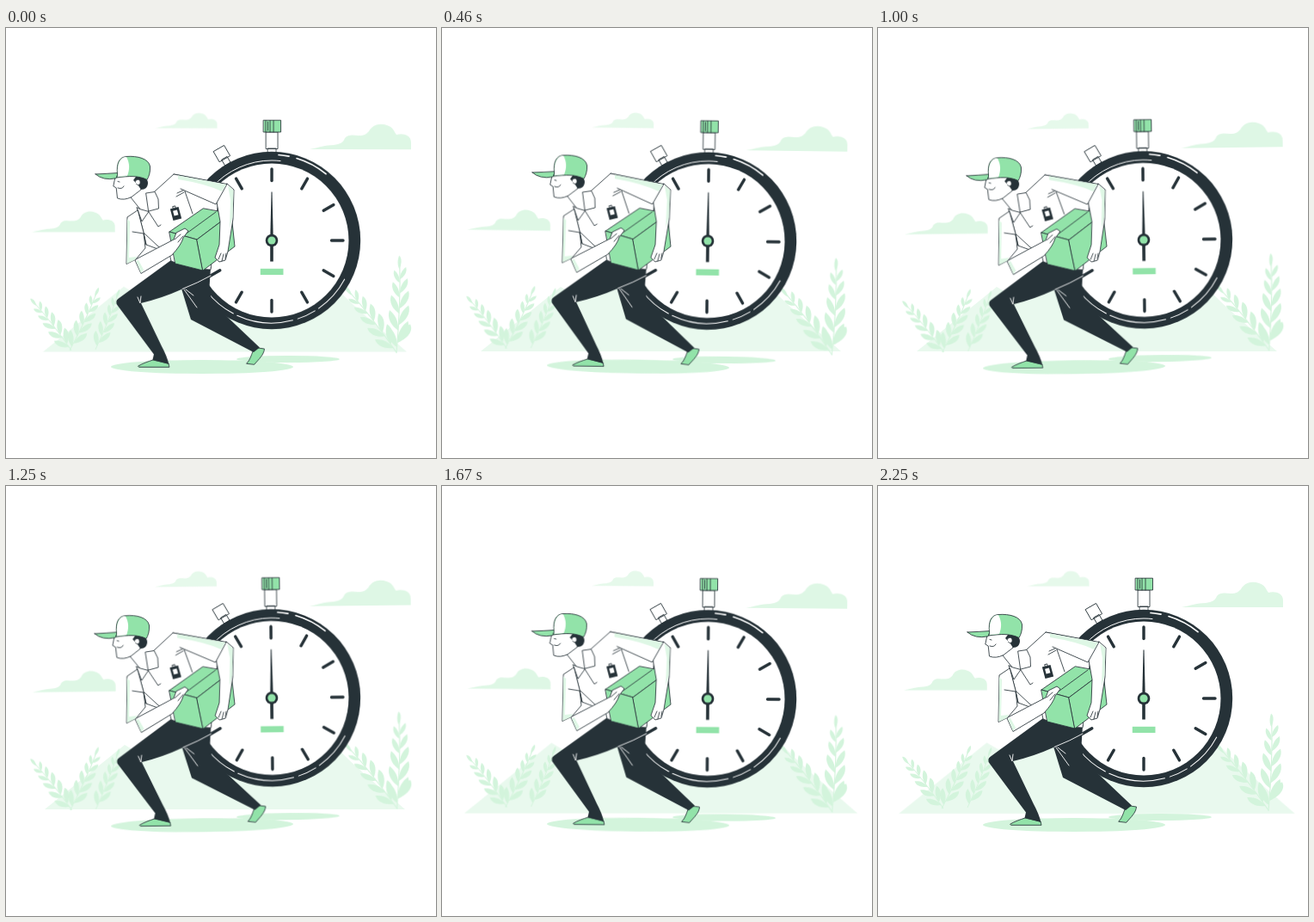
Write an HTML page without scripts that moves like this. It is 500 px wide and 500 px high and loops after 2290 ms.

```html
<!DOCTYPE html>
<html lang="en">
<head>
<meta charset="utf-8">
<title>Delivery against the clock</title>
<style>
html, body { margin: 0; width: 100%; height: 100%; overflow: hidden; background: #fff; }
svg { display: block; width: 100%; height: 100%; }

.sway { animation: sway 2.29s linear infinite; }
.hill { animation: pulse 2.29s linear infinite; transform-origin: 254.5px 326px; fill: #e9f9ee; }
.clouds { transform-origin: 250.5px 168px; fill: #def7e5; }
.shadows { transform-origin: 255px 391px; fill: #d3f4dc; }
.plants { transform-origin: 250px 324px; fill: #d3f4dc; }
.race { transform-origin: 258px 250px; }

.ink { stroke: #263238; stroke-width: .85; stroke-linejoin: round; stroke-linecap: round; }
.line { fill: none; }
.white { fill: #fff; }
.green { fill: #92e3a9; }
.dark { fill: #263238; }
.pale { fill: #def7e5; }
.glint { fill: none; stroke: #fff; stroke-linecap: round; }

/* a 1.5s swing cut off by the shorter loop */
@keyframes sway {
  0% { transform: rotate(.037deg); }
  15.9% { transform: rotate(1deg); }
  48.8% { transform: rotate(-1deg); }
  81.8% { transform: rotate(1deg); }
  100% { transform: rotate(-.1deg); }
}
/* a 1.5s double heartbeat cut off by the shorter loop */
@keyframes pulse {
  0% { transform: scale(1.009); }
  6% { transform: scale(1.1); }
  19.2%, 25.7% { transform: scale(1); }
  32.3% { transform: scale(1.1); }
  38.9%, 65.3% { transform: scale(1); }
  71.9% { transform: scale(1.1); }
  85.1%, 91.7% { transform: scale(1); }
  98.25% { transform: scale(1.1); }
  100% { transform: scale(1.073); }
}
</style>
</head>
<body>
<svg viewBox="0 0 500 500">
  <defs>
    <path id="cloud" d="M0 0C10-2 19-5 28-5 36-6 39-8 41-13 45-18 52-16 57-16 64-16 66-18 69-21 73-29 82-31 90-28 97-26 98-21 101-17 108-19 118-17 118-8V0Z"/>
    <path id="leaf" d="M0 0C0-7 4-12 10-15 13-9 7-3 0 0Z"/>
    <g id="pair"><use href="#leaf"/><use href="#leaf" transform="translate(0 4) scale(-1 1)"/></g>
    <g id="frond">
      <path d="M0 0Q3-40 0-72" fill="none" stroke="#d3f4dc" stroke-width="1.1"/>
      <use href="#pair" transform="translate(.6 -9) scale(1.1)"/>
      <use href="#pair" transform="translate(1.2 -22) scale(1.05)"/>
      <use href="#pair" transform="translate(1.5 -35) scale(.95)"/>
      <use href="#pair" transform="translate(1.3 -47) scale(.8)"/>
      <use href="#pair" transform="translate(.8 -58) scale(.65)"/>
      <use href="#leaf" transform="translate(0 -66) rotate(-38) scale(.6)"/>
    </g>
    <path id="tick" d="M0-83V-69.500" stroke="#263238" stroke-width="3.4" stroke-linecap="round"/>
    <g id="ticks">
      <use href="#tick"/><use href="#tick" transform="rotate(30)"/><use href="#tick" transform="rotate(60)"/>
    </g>
  </defs>

  <path class="hill" d="M45 376L138 301 150 308 185 298 250 300 386 306Q402 322 418 336L464 376Z"/>

  <g class="clouds sway">
    <use href="#cloud" x="353" y="141"/>
    <use href="#cloud" transform="translate(30 237.500) scale(.82)"/>
    <use href="#cloud" transform="translate(173.500 116.700) scale(.61)" opacity=".75"/>
  </g>

  <g class="shadows sway">
    <ellipse cx="228" cy="394" rx="106" ry="8"/>
    <ellipse cx="328" cy="385" rx="60" ry="4"/>
  </g>

  <g class="plants sway">
    <use href="#frond" transform="translate(76 375) rotate(-38) scale(.85 1)"/>
    <use href="#frond" transform="translate(74 375) rotate(25) scale(.85 1.05)"/>
    <use href="#frond" transform="translate(104 374) rotate(22) scale(.75 .98)"/>
    <use href="#frond" transform="translate(454 378) rotate(2) scale(1.05 1.48)"/>
    <use href="#frond" transform="translate(454 377) rotate(-38) scale(1 1.28)"/>
    <use href="#leaf" transform="translate(455 366) scale(1.5 1.45)"/>
  </g>

  <g class="race sway">
    <!-- stopwatch -->
    <g class="ink">
      <path class="white" d="M304.500 140H314V146H304.500ZM302.500 121H316V140.500H302.500Z"/>
      <path class="green" d="M299.500 107.200H319.500V121H299.500Z"/>
      <path class="line" d="M302 107.500V121M304.500 109V119M307 107.500V121M311 107.500V121"/>
      <g class="white" transform="translate(251 146) rotate(-30)">
        <path d="M-3.500 6H3.500V14H-3.500ZM-7-7H7V7H-7Z"/>
      </g>
    </g>
    <g transform="translate(309 247)">
      <circle class="dark" r="103.2"/>
      <circle class="white" r="89.5"/>
      <g class="glint" stroke-width="1">
        <circle r="93" stroke-dasharray="62 6 88 400" transform="rotate(180)"/>
        <circle r="96" stroke-dasharray="46 5 22 6 66 5 40 500" transform="rotate(28)"/>
        <path d="M8-99.500A99.800 99.800 0 0 1 20-97.800M29-95.500A99.800 99.800 0 0 1 63-77.400" stroke-width="1.700"/>
      </g>
      <use href="#ticks"/>
      <use href="#ticks" transform="rotate(90)"/>
      <use href="#ticks" transform="rotate(180)"/>
      <use href="#ticks" transform="rotate(270)"/>
      <path class="dark" d="M-.5-56.500H.5L1.800 0V24.500H-1.800V0Z"/>
      <circle class="dark" r="7.3"/>
      <circle class="green" r="4.6"/>
      <path class="green" d="M-13.200 32.800H13.500V40H-13.200Z"/>
    </g>

    <!-- shoes and trousers -->
    <g class="ink green">
      <path d="M154 393C159 390 165 388 171 386L189 390 190 394.300H155Z"/>
      <path d="M280 390C284 386 285 381 287 376L293 372 300.500 373C300 380 294 385 289 391Z"/>
    </g>
    <path class="dark" d="M238 279L236.500 302 239.500 319 295 371.500 288 377 215 339 204 303Z"/>
    <path class="dark" d="M192 270L131 314.500Q126 318 130 323L172 379.500 170.500 386 189.500 391Q187 381 181 370L157 320Q182 314 204 304 234 292 239 278Z"/>
    <path class="glint" stroke-width=".9" d="M205 303.500Q224 296 238 288M153 313L156 320 157 312M207 304L222 325M209 304L218 311"/>

    <!-- neck and torso -->
    <path class="ink white" d="M153 212L160 238 163 252 190 262 192 271Q214 281 238 281L247 200 257 182 195 170 173 190 164 198Z"/>
    <path class="white" d="M146 196L157 214 166 213 175 195 164 182 150 186Z"/>
    <path class="ink line" d="M145 197L157 212"/>

    <!-- head and cap -->
    <path class="ink white" d="M127 173L124.800 184 128.200 186 129.500 198Q137 201 146 196.500L157 188 158 172Z"/>
    <path class="dark" d="M151 173C158 171 165 174 165 180 165 185 162 188 157 188L153 182 148 177Z"/>
    <path class="ink white" d="M150.500 178C152 175 157 176 156 180.500 155 183 153 183 151.500 181.500"/>
    <path class="ink line" d="M130 186Q135 188 137 184M130 178.500L132 179"/>
    <path class="ink green" d="M104 170Q117 169.500 131 168.500L128 174.800Q113 178 104 170Z"/>
    <path class="ink green" d="M129.500 170C128 157 132 150 140 149.500 153 148.500 166 152 167.500 161 168 168 166 173 164 176.500 154 171.500 143 172 129 174Z"/>
    <path class="white" d="M130 170C129 157 133 150 140 150 144 157 144 165 141 172L130 173Z"/>

    <!-- collar, seam and badge -->
    <path class="ink white" d="M163 192L173 190.500 177 199 177.500 210 166 213ZM152 209L158 225 166 213.500 157 211Z"/>
    <path class="ink line" d="M166 214L177 231 180 229M199 192L210 187M198 196L207 191M161 239L177 254 190 262"/>
    <g transform="translate(197.500 216) rotate(-15)">
      <path class="ink line" d="M-1.500-6V-9H1.500V-6"/>
      <path class="dark" d="M-5-7H5V7H-5Z"/>
      <path class="white" d="M-2.500-4H2.500V2H-2.500Z"/>
    </g>

    <!-- parcel -->
    <g class="ink green">
      <path d="M229 210L190 237 222 246 262 216Z"/>
      <path d="M190 237L222 246 229 282 197 274Z"/>
      <path d="M222 246L262 216 266 254 229 282Z"/>
      <path class="line" d="M207 241L244 214"/>
    </g>

    <!-- near arm -->
    <path class="ink white" d="M150 270L157 285.500 193 264Q204 252 206 244L212 236 208 233 198 238 195 246 174 257Z"/>
    <path class="ink line" d="M196 246L203 240M200 249L206 242"/>
    <path class="ink white" d="M153 212L141 220 140 274.500 151 269 162 256 160 238Z"/>
    <path class="pale" d="M141 222L144 225 143 267 152 266 150 269.500 140.500 274Z"/>
    <path class="pale" d="M151 271L154 270 160 281 157 285Z"/>
    <path class="ink line" d="M147 237L160 239 163 252"/>

    <!-- far arm -->
    <path class="ink white" d="M244 197L249 225 248 252 243 267 248 272 255 270 258 260 264 222 265 188 257 181Z"/>
    <path class="ink line" d="M247 269L250 262M251 271L253 263M255 268L256 262"/>
    <path class="ink white" d="M195 170L257 181.500 244 205 203 187"/>
    <path class="pale" d="M200 171.500L256 182 251 190Q232 181 200 176Z"/>
    <path class="pale" d="M258 183L264.500 189 263.500 220 260 232 261 200Z"/>
    <path class="ink line" d="M208 190L217 216"/>
  </g>
</svg>
</body>
</html>
```
